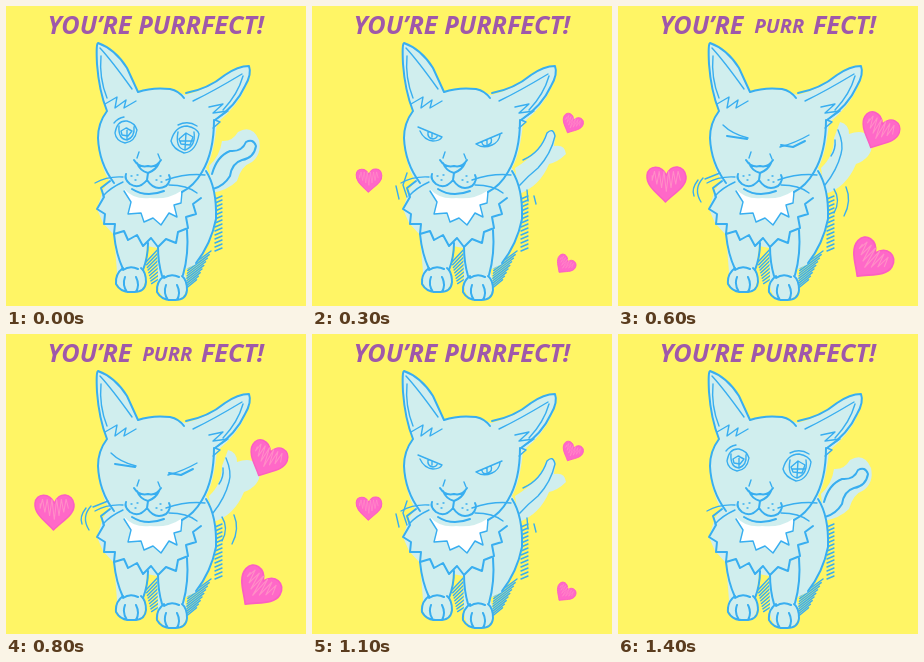
An HTML page that plays this animation: 300 by 300 pixels, repeating every 1500 ms.

```html
<!DOCTYPE html>
<html lang="en">
<head>
<meta charset="utf-8">
<title>You're purrfect!</title>
<style>
html, body { margin: 0; width: 100%; height: 100%; overflow: hidden; background: #fff565; }
svg { display: block; width: 100vw; height: 100vh; }
.line { fill: none; stroke: #38aef0; stroke-width: 2; stroke-linecap: round; stroke-linejoin: round; }
.thin { stroke-width: 1.4; }
.fur { fill: #d0eeee; }
.title { font: italic 700 24px "Open Sans", "Noto Sans", sans-serif; font-stretch: 80%; fill: #9f58aa; }
</style>
</head>
<body>
<svg viewBox="0 0 300 300">
  <rect width="300" height="300" fill="#fff565"/>

  <!-- tails -->
  <g data-pose="open">
    <path class="fur" d="M203 160Q214 150 216 135Q226 136 232 126Q246 118 253 134Q256 148 246 156Q235 160 231 175Q222 184 206 187Z"/>
    <path class="line" d="M206 168Q211 150 224 145Q236 146 240 136Q247 132 250 140Q248 152 236 154Q226 157 224 170Q218 180 207 183"/>
  </g>
  <g data-pose="half">
    <path class="fur" d="M203 162Q228 147 234 128Q241 121 243 130L242 140Q253 138 254 148Q246 156 237 158Q228 180 207 188Z"/>
    <path class="line thin" d="M211 154Q229 146 235 127Q241 121 243 130Q239 148 226 162Q216 170 207 180"/>
  </g>
  <g data-pose="shut">
    <path class="fur" d="M203 162Q216 150 216 132L222 116Q231 118 231 128Q250 121 254 138Q254 152 238 158Q228 182 207 188Z"/>
    <path class="line thin" d="M220 124Q226 138 223 148Q219 164 207 179M213 150Q218 143 217 134"/>
  </g>

  <path id="hatch" class="line thin"/>

  <!-- cat -->
  <path class="fur" d="M91 37Q109 43 121 62L132 86Q146 81 164 83L179 89Q203 83 219 69Q232 60 243 60Q246 68 240 80Q232 100 211 117Q208 148 200 162Q210 176 211 212Q205 240 190 258L178 264Q187 292 167 295Q150 294 152 270L151 242L141 240L138 262Q143 287 125 287Q108 286 111 266L108 229L97 217L91 203L97 184L103 175Q92 155 92 132Q93 116 101 105Q90 82 91 37Z"/>
  <path fill="#fff" d="M118 183Q128 194 144 192Q162 194 175 185L175 197L168 199L171 211L163 207L155 219L147 212L138 216L135 207L122 208L125 197Z"/>
  <path class="line" d="M101 105Q93 85 91 58Q90 37 92 37Q109 43 121 62L132 86M132 86Q146 81 164 83Q173 85 178 92M180 87Q202 83 219 69Q232 60 243 60Q246 68 239 80Q230 100 209 114M101 105Q92 117 92 132Q93 157 108 177M208 114Q208 146 196 166Q188 180 176 186"/>
  <path class="line thin" d="M94 42Q106 55 126 83M95 50Q93 72 101 92M99 98L111 91L109 102L120 94L118 102L130 95M187 95Q206 86 236 68M237 70Q232 88 217 104M203 101L217 98L207 107L222 105L209 114L214 116L207 122"/>
  <path class="line" d="M104 175L95 182L98 191L91 203L99 208L98 218L109 218L108 228L118 225L122 234L131 229L137 240L145 232L152 241L160 233L170 237L172 226L182 222L180 211L190 208L187 198L195 192"/>
  <path class="line thin" d="M118 185L125 196L122 208L135 207L138 216L147 212L155 219L163 207L171 211L168 199L175 197L176 186"/>
  <path class="line" d="M108 228Q110 248 117 263M142 237Q142 251 137 264M152 241Q152 256 156 270M181 224Q183 248 177 269M200 165Q211 182 210 213Q205 238 190 257"/>
  <path id="paw" class="line" d="M117 262Q109 268 110 278Q115 287 126 286Q139 287 140 276Q140 266 135 262M119 271Q116 279 121 286M130 271Q134 279 130 286M117 264Q124 259 132 263"/>
  <use href="#paw" x="41" y="8"/>

  <!-- muzzle -->
  <path class="line" d="M128 154Q133 162 142 160Q150 162 155 154M131 157Q134 165 142 167Q150 164 153 157M142 167L141 174Q133 184 124 178Q118 173 120 168M141 174Q149 186 160 180Q166 174 163 169M126 183Q140 192 158 185"/>
  <path class="line thin" d="M133 146L131 152M152 148L154 153M125 170h1M129 174h1M131 169h1M150 174h1M155 176h1M154 170h1M117 171Q101 170 89 177M117 176Q104 182 97 190M160 174Q181 167 199 169M163 179Q181 179 191 187"/>

  <!-- eyes -->
  <g data-pose="open">
    <path class="line thin" d="M109 127Q111 114 121 115Q129 117 131 124Q129 136 119 137Q110 135 109 127ZM165 135Q169 120 181 120Q191 122 193 128Q190 146 178 147Q167 143 165 135ZM113 120Q112 133 121 134Q129 131 128 121M172 126Q169 142 179 144Q190 140 188 126"/>
    <path class="line thin" d="M115 125L120 122L126 125L122 130L116 129ZM121 122V133M173 133L180 127L187 131L184 139L175 138ZM180 127L179 143M174 135H187"/>
    <path class="line thin" d="M108 117Q112 112 118 111M172 119Q182 114 191 120"/>
  </g>
  <g data-pose="half" class="line thin">
    <path d="M106 121L130 131M108 125Q112 134 121 135Q128 135 130 131M116 126Q115 132 121 133Q126 132 125 129M120 128V131M164 138L190 127M164 138Q171 143 180 139Q187 136 188 129M170 136Q170 141 176 139Q181 137 179 132M175 134V138"/>
  </g>
  <g data-pose="shut" class="line">
    <path class="thin" d="M105 119Q114 128 130 132M162 141Q177 137 191 129"/>
    <path d="M109 130L129 133M163 139L175 141L187 135"/>
  </g>

  <!-- purring marks -->
  <path data-pose="half" class="line thin" d="M95 167L91 179L95 191M84 180L87 193M215 184L216 195M222 190L224 198"/>
  <path id="buzzA" class="line thin" d="M83 168Q75 183 80 199M91 179Q87 185 93 192M222 183Q229 194 220 209M215 185Q219 190 217 197"/>
  <path id="buzzB" class="line thin" d="M102 167L87 173M85 172Q75 183 83 196M80 174Q73 183 76 190M216 183Q223 194 216 207M228 181Q234 195 226 210"/>

  <g id="hearts"></g>
  <g class="title" id="title"><text>YOU’RE</text><text>PURR</text><text>FECT!</text></g>
</svg>
<script>
const STEP = 100, COUNT = 15;
const $ = id => document.getElementById(id);
const poses = [...document.querySelectorAll("[data-pose]")];
const show = (el, on) => { el.style.display = on ? "" : "none"; };

// Heart centre and width when small, swelling and settled
const hearts = [
  { tilt: 0, small: [57, 174, 27], swell: [51.5, 178, 42], full: [48.5, 177.5, 41] },
  { tilt: 24, small: [260, 118, 22], swell: [260.5, 119, 37], full: [261, 125.5, 40] },
  { tilt: 36, small: [253, 259, 21], swell: [253, 257, 43], full: [252, 254.5, 45] }
];

// Title: left edge, width and middle line
const LEFT = 41.5, WIDTH = 216.5, MID = 19;
const [youre, purr, fect] = $("title").children;
let fontSize, purrX;

// Offset x, offset y, scale and angle of the shaking word
const still = [0, 0, 1, 0];
const shakes = [[6, -4, .89, 3], [4, 1, .8, 0], [7, -4, .87, 3], [4, 1, .8, 0], [8, 1, .92, 2]];

function drawHatch() {
  let d = "";
  for (let y = 190; y < 246; y += 4) d += `M209 ${y + 3}L216 ${y}`;
  for (let i = 0; i < 9; i++) {
    d += `M${182 - i * .3} ${262 + i * 2.6}L${205 - i * 1.8} ${245 + i * 3.6}`;
    d += `M${140 + i * .7} ${256 + i * 2.7}L${155 - i * .1} ${240 + i * 4}`;
  }
  $("hatch").setAttribute("d", d);
}

function makeHearts() {
  let scribble = "M-14 -8";
  for (let i = 0; i < 13; i++) {
    scribble += `L${-14 + i * 2.3} ${i % 2 ? -12 : 8 - Math.abs(i - 6) * 1.8}`;
  }
  $("hearts").innerHTML = hearts.map(() => `<g>
    <path fill="#ff68c8" stroke="#fb5fc2" stroke-width="1.5" stroke-linejoin="round"
      d="M-1 18C-8 10 -20 3 -19 -8C-18 -18 -5 -19 0 -8C4 -20 18 -18 19 -7C20 3 8 9 -1 18Z"/>
    <path fill="none" stroke="#ff8ec6" stroke-width="1" d="${scribble}"/>
  </g>`).join("");
}

function layTitle() {
  const probe = youre.cloneNode();
  probe.textContent = "YOU’RE PURRFECT!";
  $("title").append(probe);
  fontSize = 24 * WIDTH / probe.getComputedTextLength();
  probe.remove();
  $("title").style.fontSize = fontSize + "px";
  const right = LEFT + WIDTH - fect.getComputedTextLength();
  purrX = right - purr.getComputedTextLength();
  place(youre, LEFT, still);
  place(fect, right, still);
}

function place(word, x, [dx, dy, scale, angle]) {
  word.setAttribute("y", fontSize * .357);
  word.setAttribute("transform", `translate(${x + dx} ${MID + dy}) rotate(${angle}) scale(${scale})`);
}

const mix = (a, b, k) => a.map((v, i) => v + (b[i] - v) * k);

function heartAt(h, n, k) {
  if (k < 4) {
    const [x, y, w] = h.small;
    return [x, y, w * [0, .35, .65, 1][k]];
  }
  if (k === 4) return mix(h.small, h.swell, .55);
  return n === 5 ? h.swell : h.full;
}

function draw(ms) {
  const n = Math.floor(ms / STEP) % COUNT;
  const k = Math.min(n, COUNT - 1 - n);
  const pose = k < 2 ? "open" : k < 4 ? "half" : "shut";
  const early = k === 4 || n === 5;
  for (const el of poses) show(el, el.dataset.pose === pose);
  show($("buzzA"), early);
  show($("buzzB"), k > 4 && !early);

  hearts.forEach((h, i) => {
    const [x, y, w] = heartAt(h, n, k);
    const el = $("hearts").children[i];
    show(el, w);
    el.setAttribute("transform", `translate(${x} ${y}) rotate(${h.tilt}) scale(${w / 40})`);
  });
  place(purr, purrX, shakes[n - 5] || still);
}

drawHatch();
makeHearts();
layTitle();
const start = performance.now();
function tick() {
  draw(performance.now() - start);
  requestAnimationFrame(tick);
}
tick();
</script>
</body>
</html>
```
